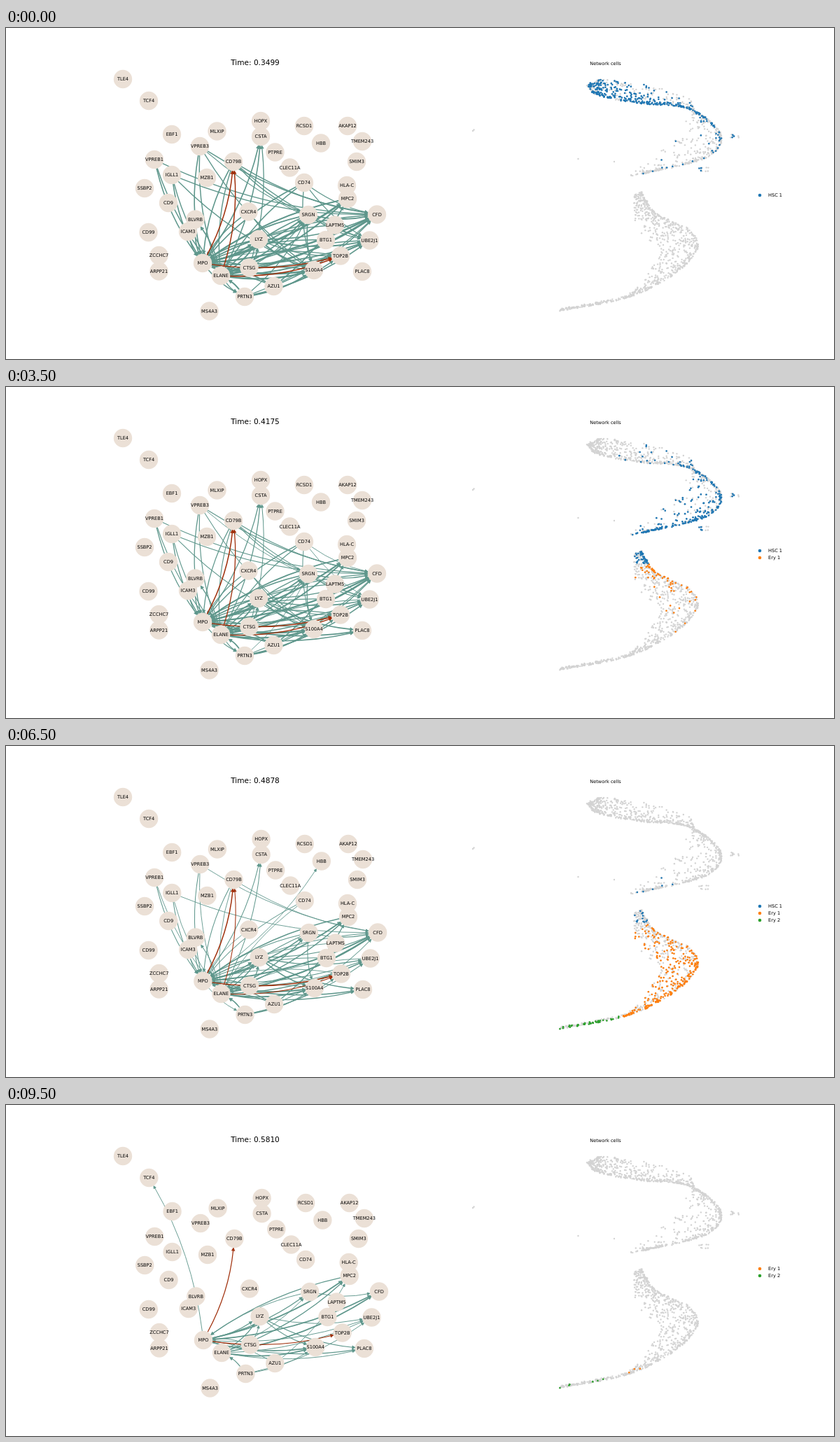
Recreate the animation shown at these times as an HTML page with a canvas. Size 1183x473 px, loop 10 s.

```html
<!DOCTYPE html>
<html lang="en">
<head>
<meta charset="utf-8">
<title>Network over time</title>
<style>
  html, body { margin: 0; width: 100%; height: 100%; overflow: hidden; background: #fff; }
  canvas { display: block; }
</style>
</head>
<body>
<canvas id="stage" width="1183" height="473"></canvas>
<script>
const ctx = document.getElementById('stage').getContext('2d');
const STEP = 500, STEPS = 20;
const TEAL = '#5f978c', RED = '#a0300c', SAND = '#ebe0d6', GREY = '#d3d3d3';
const KINDS = [
  { name: 'HSC 1', color: '#1f77b4', from: 0, until: 16 },
  { name: 'Ery 1', color: '#ff7f0e', from: 3, until: 20 },
  { name: 'Ery 2', color: '#2ca02c', from: 9, until: 20 }
];
// step and displayed time; linear in between
const CLOCK = [[0, .3499], [3, .3763], [7, .4175], [11, .4685], [13, .4878], [16, .5249], [19, .5810]];

const nodes = {};
`TLE4 167 73,TCF4 204 104,EBF1 237 152,MLXIP 301.5 147.5,HOPX 364 133,CSTA 364 155,RCSD1 426 140,AKAP12 488 140,
TMEM243 509 162,HBB 450 164.5,SMIM3 501 191,PTPRE 384.5 177.5,CLEC11A 405.5 199.5,VPREB3 277 169,VPREB1 212 188,
CD79B 325 191,IGLL1 237 210,MZB1 287 214,SSBP2 198 229,CD74 426 221,HLA-C 487 225,MPC2 488 244,CD9 232 250,
CXCR4 346.5 262.5,SRGN 432 267,CFD 530 266.5,BLVRB 270.5 273.5,ICAM3 260 291,CD99 203.5 292,LAPTM5 470 281.5,
LYZ 361 302,BTG1 457 303,UBE2J1 519.5 303.5,ZCCHC7 218.5 325,TOP2B 478 325.5,MPO 281 336,ARPP21 218.5 347.5,
CTSG 347.5 342.5,S100A4 440 346,PLAC8 509 348,ELANE 307 354,AZU1 382.5 369,PRTN3 341 384,MS4A3 290.5 404.5`
  .split(/,\s*/).forEach(row => {
    const [name, x, y] = row.split(' ');
    nodes[name] = [+x, +y];
  });

// source and its targets, grouped by the step at which the edges fade out
const edges = Object.entries({
  40: 'MPO>CFD,MPC2,S100A4 ELANE>CFD,S100A4',
  28: 'MPO>LYZ,SRGN,PLAC8,CD79B,TOP2B ELANE>LYZ,MPC2 LYZ>S100A4,PLAC8 MPC2>MPO PRTN3>ELANE',
  22: 'MPO>UBE2J1,TCF4 ELANE>PLAC8,SRGN,UBE2J1 CTSG>LYZ,MPO LYZ>UBE2J1 SRGN>CFD,MPO PRTN3>S100A4,UBE2J1 AZU1>MPO,MPC2',
  18: `VPREB3>MPO CD79B>MPO MPO>CSTA ELANE>CSTA,BLVRB,CD79B,TOP2B VPREB1>MPO IGLL1>MPO CD74>MPO BLVRB>MPO CFD>MPO
       LYZ>CFD,MPO CTSG>CFD AZU1>CFD,ELANE BTG1>MPO SRGN>S100A4,ELANE S100A4>ELANE PRTN3>TOP2B`,
  15: `VPREB1>ELANE IGLL1>ELANE,CFD VPREB3>CFD,ELANE CD79B>CFD,ELANE CD74>ELANE CXCR4>MPO LAPTM5>MPO MPO>HBB,PRTN3
       UBE2J1>ELANE TOP2B>MPO CTSG>UBE2J1 ICAM3>MPO`,
  12: `VPREB1>CFD IGLL1>S100A4 VPREB3>S100A4 CXCR4>S100A4 CD74>S100A4 ELANE>PRTN3 CTSG>CSTA SRGN>UBE2J1
       CD79B>SRGN,UBE2J1 PRTN3>CFD LYZ>TOP2B`,
  9: 'VPREB3>UBE2J1 CD74>CFD,UBE2J1 CTSG>SRGN PRTN3>SRGN'
}).flatMap(([end, list]) => list.split(/\s+/).flatMap(entry => {
  const [from, targets] = entry.split('>');
  return targets.split(',').map(to => ({
    from, to, end: +end,
    isRed: /MPO|ELANE/.test(from) && /CD79B|TOP2B/.test(to)
  }));
})).sort((a, b) => a.isRed - b.isRed);
const FIRST_STEP = { TCF4: 16, HBB: 9, PLAC8: 5 };

// two ribbons of cells, each between a dense rim and a loose one
const UPPER = {
  rim: [[831, 82], [847, 96], [905, 107], [975, 115], [1021, 152], [1000, 185], [913, 207]],
  loose: [[846, 73], [878, 76], [922, 83], [980, 106], [960, 150], [938, 174], [886, 213]]
};
const LOWER = {
  rim: [[908, 234], [928, 264], [976, 289], [987, 316], [955, 351], [890, 384], [790, 404]],
  loose: [[898, 238], [897, 264], [903, 290], [933, 318], [918, 347], [886, 382], [795, 400]]
};

let seed = 11;
const rand = () => (seed = (seed * 16807) % 2147483647) / 2147483647;
const lerp = (a, b, t) => a + (b - a) * t;

// Catmull-Rom curve through the points, t from 0 to 1
function curve(points, t) {
  const last = points.length - 1, i = Math.min(Math.floor(t * last), last - 1), u = t * last - i;
  const [p, a, b, q] = [-1, 0, 1, 2].map(k => points[Math.max(0, Math.min(last, i + k))]);
  return [0, 1].map(k => a[k] + u / 2 * (b[k] - p[k] + u * (2 * p[k] - 5 * a[k] + 4 * b[k] - q[k]
    + u * (3 * (a[k] - b[k]) + q[k] - p[k]))));
}

const cells = [];
function addCell(x, y, age, depth = 0) {
  cells.push({
    x, y,
    phase: age + 3 * depth + rand() - .5,
    chance: rand() / (.75 - .35 * depth),
    kind: age < 17.6 ? 0 : age < 27.9 ? 1 : 2
  });
}
function addRibbon({ rim, loose }, count, startAge, span, power) {
  for (let i = 0; i < count; i++) {
    const t = rand(), depth = rand() ** power(t);
    const a = curve(rim, t), b = curve(loose, t);
    const [x, y] = a.map((v, k) => lerp(v, b[k], depth) + rand() * 2 - 1);
    addCell(x, y, startAge + span * t, depth);
  }
}
addRibbon(UPPER, 900, 0, 15, t => Math.min(4, 1.6 + 5 * t));
addRibbon(LOWER, 820, 16, 14, () => 2.2);
for (let i = 0; i < 9; i++) {
  addCell(1035 + 12 * rand(), 152 + 6 * rand(), 9);
  addCell(990 + 14 * rand(), 198 + 7 * rand(), 9);
}
for (const [x, y] of [[667, 147], [668.5, 145.5], [817.5, 187], [869, 191]]) addCell(x, y, -30);

function timeAt(step) {
  const i = Math.max(1, CLOCK.findIndex(([s]) => s >= step));
  const [s0, t0] = CLOCK[i - 1], [s1, t1] = CLOCK[i];
  return lerp(t0, t1, (step - s0) / (s1 - s0));
}

function dot(x, y, r, color) {
  ctx.fillStyle = color;
  ctx.beginPath();
  ctx.arc(x, y, r, 0, 7);
  ctx.fill();
}

function label(text, x, y, align = 'center', size = 6.6) {
  ctx.font = `${size}px "DejaVu Sans", sans-serif`;
  ctx.textAlign = align;
  ctx.fillStyle = '#000';
  ctx.fillText(text, x, y + size * .365);
}

function toward(from, to, distance) {
  const dx = to[0] - from[0], dy = to[1] - from[1], k = distance / Math.hypot(dx, dy);
  return [from[0] + dx * k, from[1] + dy * k];
}

function arrow(from, to, width, color) {
  const dx = to[0] - from[0], dy = to[1] - from[1];
  const bend = [from[0] + dx / 2 - dy * .1, from[1] + dy / 2 + dx * .1];
  const start = toward(from, bend, 13), tip = toward(to, bend, 13.5), neck = toward(to, bend, 17);
  const nx = (tip[1] - neck[1]) * .5, ny = (neck[0] - tip[0]) * .5;
  ctx.strokeStyle = ctx.fillStyle = color;
  ctx.lineWidth = width;
  ctx.beginPath();
  ctx.moveTo(...start);
  ctx.quadraticCurveTo(...bend, ...neck);
  ctx.stroke();
  ctx.beginPath();
  ctx.moveTo(...tip);
  ctx.lineTo(neck[0] + nx, neck[1] + ny);
  ctx.lineTo(neck[0] - nx, neck[1] - ny);
  ctx.closePath();
  ctx.fill();
  ctx.lineWidth = Math.min(width, 1.5);
  ctx.stroke();
}

function drawNetwork(step) {
  const stretch = step < 12 ? 1 : step < 16 ? 1.003 : 1.0083;
  const at = name => [167 + (nodes[name][0] - 167) * stretch, nodes[name][1]];
  for (const { from, to, end, isRed } of edges) {
    if (step >= end || step < (FIRST_STEP[to] || 0)) continue;
    const width = .8 + .045 * (end - step);
    arrow(at(from), at(to), isRed ? Math.min(width, 1.5) : width, isRed ? RED : TEAL);
  }
  for (const name in nodes) dot(...at(name), 13.2, SAND);
  for (const name in nodes) label(name, ...at(name));
}

// a bell-shaped window of active cells travels along the ribbons with time
function drawCells(step, time) {
  const center = 4 + 155 * (time - .35);
  const kindShown = kind => step >= kind.from && step < kind.until;
  for (const { x, y } of cells) dot(x, y, 1.2, GREY);
  for (const { x, y, phase, chance, kind } of cells) {
    const activity = Math.exp(-(((phase - center) / 4) ** 2) / 2);
    if (kindShown(KINDS[kind]) && chance < activity) dot(x, y, 1.3, KINDS[kind].color);
  }
  const legend = KINDS.filter(kindShown);
  legend.forEach(({ name, color }, i) => {
    const y = 239 + (i - (legend.length - 1) / 2) * 10;
    dot(1077, y, 2.3, color);
    label(name, 1089, y, 'left');
  });
}

let current = -1;
function tick(now) {
  const step = Math.floor(now / STEP) % STEPS;
  if (step !== current) {
    current = step;
    const time = timeAt(step);
    ctx.fillStyle = '#fff';
    ctx.fillRect(0, 0, 1183, 473);
    drawNetwork(step);
    drawCells(step, time);
    label('Time: ' + time.toFixed(4), 356, 49.3, 'center', 10.55);
    label('Network cells', 856.5, 50.8);
  }
  requestAnimationFrame(tick);
}
requestAnimationFrame(tick);
</script>
</body>
</html>
```
